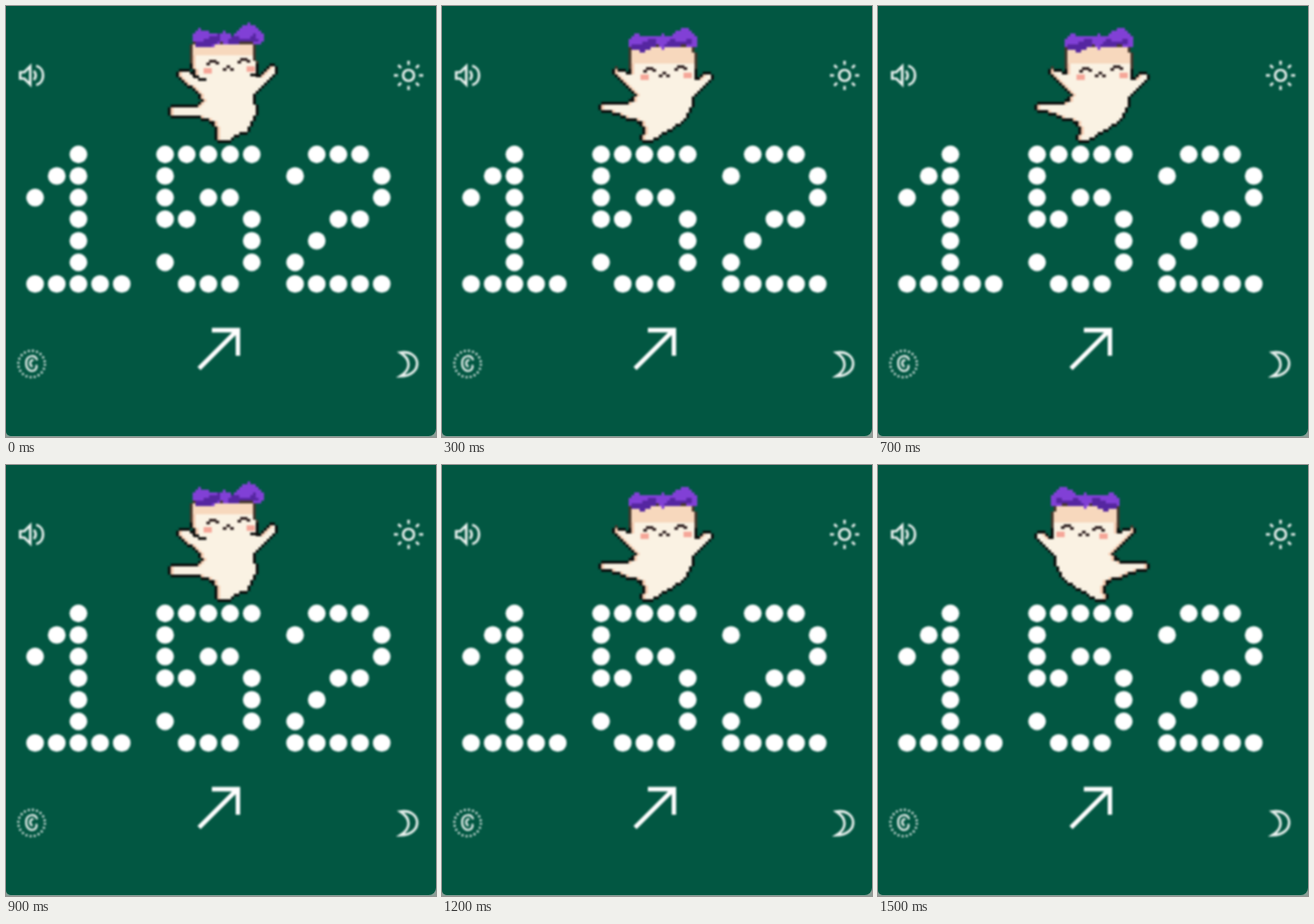
Write an HTML page with a canvas that moves like this. It is 470x472 px and loops after 1600 ms.

```html
<!DOCTYPE html>
<html lang="en">
<head>
<meta charset="utf-8">
<style>
  html, body { margin: 0; width: 470px; height: 472px; overflow: hidden; background: #8a9f97; }
  svg, canvas { position: absolute; left: 0; top: 0; }
  svg { background: #025742; border-radius: 0 0 8px 5px; }
  canvas, .soft { filter: blur(.8px); }
</style>
</head>
<body>
<svg width="470" height="471" fill="none" stroke="#eef5f2" stroke-width="2.7">
  <g class="soft">
    <g id="dots" fill="#fff" stroke="none"></g>
    <path d="M211 397L253 355M225 355H253.500V383" stroke="#fff" stroke-width="4.800"/>
    <path d="M15.5 72.5H20L26.5 66V86L20 79.5H15.5ZM30.5 71Q34.5 76 30.5 81M33 65.5C43 68 43 84 33 86.500"/>
    <g id="sun"><circle cx="440" cy="76" r="6"/></g>
    <path d="M431 379.500C454 376 457 405 431 405.500C443 398 443 387 431 379.500Z"/>
    <circle cx="28" cy="392" r="14.500" stroke-dasharray="2 2.555" stroke-width="2.400"/>
    <path d="M34 388C33 381 22 382 22 391C22 398 27 401 31 399C33 398 34 395 33 393M29 395C25 393 26 387 30 388" stroke-width="2.200"/>
  </g>
</svg>
<canvas id="stage" width="470" height="160"></canvas>
<script>
const CELL = 3, W = 470, H = 160;
const svgNS = "http://www.w3.org/2000/svg";

function addShape(parent, tag, attrs) {
  const el = document.createElementNS(svgNS, tag);
  for (const key in attrs) el.setAttribute(key, attrs[key]);
  parent.append(el);
}

const digits = [
  "..#.. .##.. #.#.. ..#.. ..#.. ..#.. #####",
  "##### #.... #.##. ##..# ....# #...# .###.",
  ".###. #...# ....# ..##. .#... #.... #####"
];
digits.forEach((digit, n) => digit.split(" ").forEach((row, y) =>
  [...row].forEach((mark, x) => {
    if (mark === "#") addShape(dots, "circle", {
      cx: 31.8 + (n * 6 + x) * 23.68, cy: 162.5 + y * 23.65, r: 9.7
    });
  })));

for (let angle = 0; angle < 360; angle += 45)
  addShape(sun, "path", { d: "M440 60v4.500", transform: `rotate(${angle} 440 76)` });

// Fills a path in square cells, with an optional outline just outside it.
function pixelate(ctx, path, colorAt, edgeAt) {
  const inside = (x, y) => ctx.isPointInPath(path, x + CELL / 2, y + CELL / 2);
  for (let y = 9; y < H; y += CELL)
    for (let x = 162; x < 312; x += CELL) {
      const left = inside(x - CELL, y);
      const near = left || inside(x + CELL, y) || inside(x, y - CELL) || inside(x, y + CELL);
      if (inside(x, y)) ctx.fillStyle = colorAt(x, y, left);
      else if (near && edgeAt) ctx.fillStyle = edgeAt(x, y);
      else continue;
      ctx.fillRect(x, y, CELL, CELL);
    }
}

function drawCat({ body, bow, bowShade, eyes, mouth, cheeks, jaw, brow }) {
  const sprite = new OffscreenCanvas(W, H), ctx = sprite.getContext("2d");
  const rects = (color, list) => {
    ctx.fillStyle = color;
    list.forEach(r => ctx.fillRect(...r));
  };
  pixelate(ctx, new Path2D(body),
    (x, y, left) => y < brow ? "#f7d8bd" : left ? "#faf2e3" : "#f3c8ad",
    (x, y) => y < brow + 8 ? "#45362b" : "#0b0c0b");
  pixelate(ctx, new Path2D(bow), () => "#8140d6");
  pixelate(ctx, new Path2D(bowShade), () => "#5526a0");
  rects("#f5a698", cheeks.map(([x, y]) => [x, y, 9, 6]));
  rects("#2a1b1b", eyes.flatMap(([x, y]) => [[x + 3, y, 8, 3], [x, y + 3, 4, 3], [x + 10, y + 2, 4, 3]]));
  const [mx, my] = mouth;
  rects("#2a1b1b", [[mx - 2, my, 4, 3], [mx - 6, my + 3, 4, 3], [mx + 2, my + 3, 4, 3]]);
  rects("#0b0c0b", jaw);
  return sprite;
}

const high = drawCat({
  body: "M204 42H270L273 78H279L289 66L296 68L292 77L278 90L271 98L272 118L267 130L262 138L249 141L242 148H232V137L228 127L212 121H181V112H206L216 103L208 92L199 86L190 77V71H197L206 77Z",
  bow: "M203 36L206 30L212 25L220 28L231 30L240 28L247 32L258 23L266 18L272 22L279 27L283 38L276 42L262 38L250 42L242 43L236 39L231 42L222 46L208 44Z",
  bowShade: "M205 39L216 38L226 33L234 31V39L222 46L208 44ZM242 40L248 33L256 31V36L264 36L272 31L276 38L262 39L250 42Z",
  eyes: [[219, 59], [253, 57]], mouth: [243, 65], cheeks: [[216, 68], [263, 66]],
  jaw: [[205, 76, 6, 3], [210, 79, 9, 3], [267, 74, 7, 3]], brow: 54
});
const low = drawCat({
  body: "M207 46H274L277 82H281L289 74L295 76L290 84L273 100L271 114L264 125L252 133L240 139L229 148H218L222 137L219 126L206 123L192 117L174 113V107L190 109L208 106L212 98L205 88L190 76V70L208 76Z",
  bow: "M204 42L206 33L212 30L220 33L232 34L241 31L249 35L257 28L265 23L271 26L277 31L281 43L274 46L262 42L250 45L242 47L236 43L231 45L222 50L208 49Z",
  bowShade: "M206 43L216 42L226 37L234 35V43L222 50L208 49ZM242 44L248 37L256 35V40L264 40L271 35L275 42L262 43L250 46Z",
  eyes: [[220, 67], [254, 65]], mouth: [243, 72], cheeks: [[217, 75], [264, 73]],
  jaw: [], brow: 61
});

// One sway: up right, up left, down left, down right.
const sway = [
  { sprite: high },
  { sprite: high, mirror: 474 },
  { sprite: low, mirror: 468 },
  { sprite: low }
];
const view = stage.getContext("2d");

function render(now) {
  const tick = Math.floor(now % 1600 / 100);
  const { sprite, mirror } = sway[(tick - (tick > 7)) % 4];
  view.resetTransform();
  view.clearRect(0, 0, W, H);
  if (mirror) view.setTransform(-1, 0, 0, 1, mirror, 0);
  view.drawImage(sprite, 0, 0);
  requestAnimationFrame(render);
}
render(performance.now());
</script>
</body>
</html>
```
